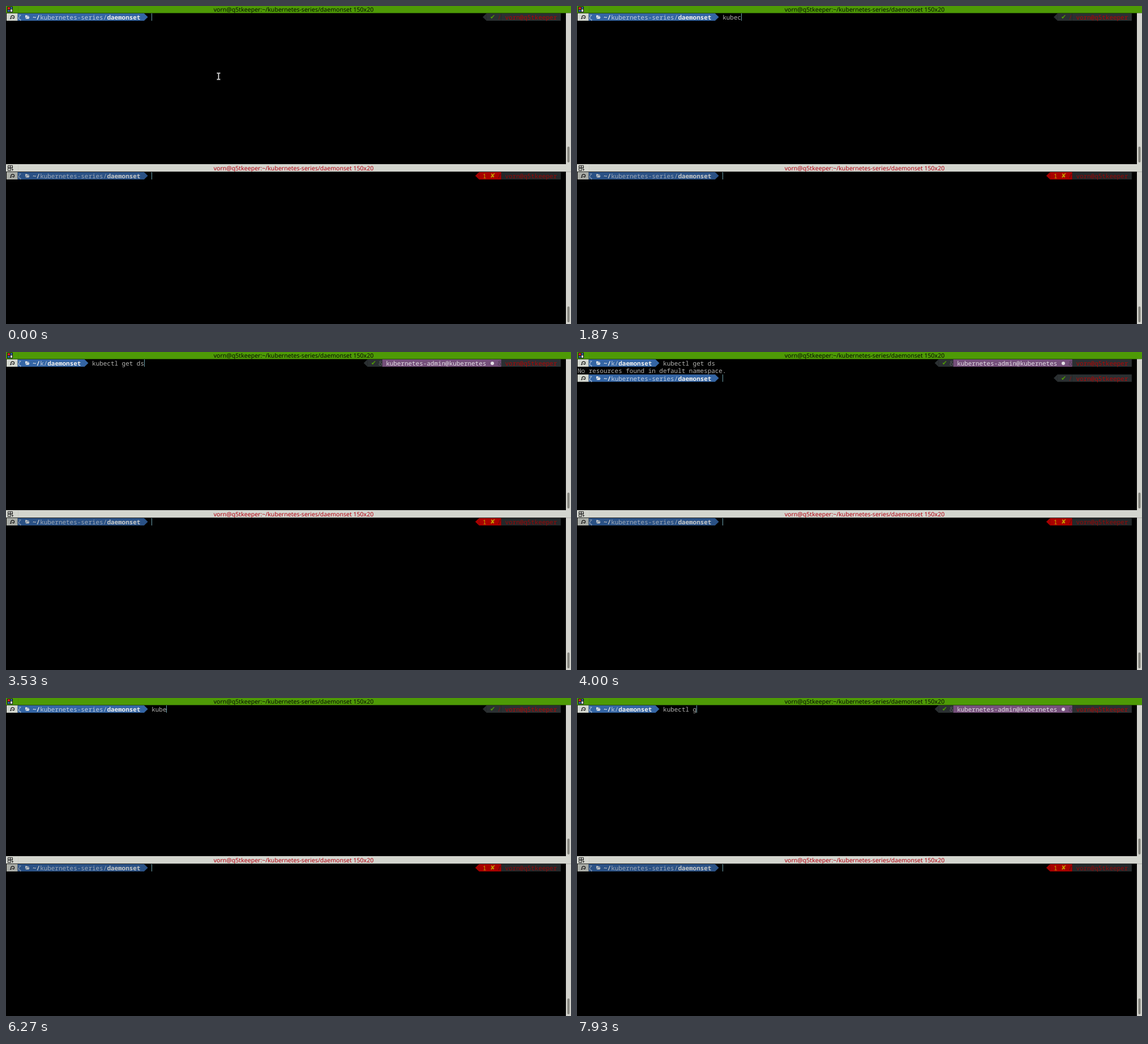
Animation, 998 px wide and 561 px high, one loop 8000 ms. Source, as an HTML page:

```html
<!DOCTYPE html>
<html lang="en">
<head>
<meta charset="utf-8">
<title>Terminal session</title>
<style>
  html, body { margin: 0; width: 100%; height: 100%; overflow: hidden; background: #000; }
  svg { display: block; width: 100vw; height: 100vh; }
  text { white-space: pre; text-rendering: geometricPrecision; }
  .mono { font: 10.95px "Noto Sans Mono", monospace; }
  .bold { font-weight: 700; }
  .mark { font: 11px "DejaVu Sans", sans-serif; }
  .title { font: 10.55px "Noto Sans", sans-serif; text-anchor: middle; }
</style>
</head>
<body>
<svg id="stage" viewBox="0 0 998 561" preserveAspectRatio="none">
  <rect width="998" height="561"/>
  <g id="frame"></g>
  <g id="lower"></g>
  <g id="upper"></g>
  <g id="pointer" fill="none" stroke-linecap="square">
    <path d="M373.5 118.5h1.5l.5 1 .5-1h1.5M375.5 119.5v9M373.5 129.5h1.5l.5-1 .5 1h1.5" stroke="#777" stroke-width="2.4"/>
    <path d="M373.5 118.5h1.5l.5 1 .5-1h1.5M375.5 119.5v9M373.5 129.5h1.5l.5-1 .5 1h1.5" stroke="#e8e8e8"/>
  </g>
</svg>
<script>
const LOOP = 8000;
const CELL = 6.57, LINE = 13.3;
const USER = 'vorn@q5tkeeper';
const COMMAND = 'kubectl get ds';

// Moments at which each further letter of the command is typed
const FIRST_KEYS = [870, 1070, 1670, 1730, 1870, 2000, 2270, 2730, 2870, 3000, 3130, 3200, 3470, 3530];
const SECOND_KEYS = [5730, 5870, 6130, 6200, 6470, 6600, 6870, 7070, 7670];
const ENTER = 3930, OUTPUT = 4000, CLEAR = 4870;
const CURSOR_OFF = [[130, 730], [4530, CLEAR], [5530, 5730]];

const BRIGHT = {
  badge: '#d3d7cf', icon: '#222', blue: '#3465a4', dir: '#c3cfdf', strong: '#f0f0ee',
  dark: '#2b3032', status: '#2b3032', user: '#b00505', ok: '#4e9a06', faint: '#5c6163'
};
const DIM = {
  badge: '#a9aca6', icon: '#1c1c1c', blue: '#2a5185', dir: '#a0abb9', strong: '#c6c8c8',
  dark: '#23282a', status: '#a80000', user: '#980606', ok: '#c4a000', faint: '#4a1012'
};

const el = id => document.getElementById(id);
const colX = col => 1 + col * CELL;
const rect = (x, y, w, h, fill) =>
  `<rect x="${x}" y="${y}" width="${w}" height="${h}" fill="${fill}"/>`;
const path = (d, fill, extra = '') => `<path d="${d}" fill="${fill}" ${extra}/>`;
const text = (x, y, str, fill, cls = 'mono') =>
  `<text x="${x.toFixed(2)}" y="${y.toFixed(2)}" fill="${fill}" class="${cls}">${str}</text>`;
const block = (from, to, y, fill) => rect(colX(from), y, (to - from) * CELL, 13, fill);
const cursor = (col, y) => rect(Math.floor(colX(col)), y, 1, 13, '#6ba0ab');

function leftPrompt(y, short, c) {
  const base = y + 10.9;
  const dir = short ? 'k' : 'kubernetes-series';
  const end = 9 + dir.length + 10;
  const tip = colX(end + 1);
  return rect(1, y, 19.7, 13, c.badge)
    + path(`M9.2 ${y + 9.2}H7.2M9.2 ${y + 9.2}C6.4 ${y + 3} 15 ${y + 2.2} 14.6 ${y + 6.8}C14.4 ${y + 9.4} 11.8 ${y + 9.2} 11.4 ${y + 7.2}`,
      'none', `stroke="${c.icon}" stroke-width="1.4"`)
    + block(3, end + 1, y, c.blue)
    + path(`M${tip - .2} ${y}l6.7 6.5l-6.7 6.5z`, c.blue)
    + text(colX(3), base, 'ζ', c.dir)
    + path(`M34 ${y + 3.5}h3l1 1h2.5v1.2h-4.3l-1.8 3.2zM36.7 ${y + 6.4}h5l-1.5 3.2h-5.5z`, c.strong)
    + text(colX(7), base, '~/', c.strong, 'mono bold')
    + text(colX(9), base, dir + '/', c.dir)
    + text(colX(10 + dir.length), base, 'daemonset', c.strong, 'mono bold');
}

function rightPrompt(y, c, { start, mark, code = '', context = false }) {
  const base = y + 10.9, x = colX(start + 1);
  const statusEnd = context ? 101 : 133;
  let out = path(`M${x + .2} ${y}l-6.7 6.5l6.7 6.5z`, c.status)
    + block(start + 1, statusEnd, y, c.status)
    + block(133, 149, y, c.dark)
    + text(colX(start + 2), base, code, c.ok)
    + text(colX(context ? 98 : 130), base - .6, mark, c.ok, 'mark');
  if (context) {
    out += text(colX(100), base, 'δ', c.faint)
      + block(101, 133, y, '#75507b')
      + text(colX(102), base, 'kubernetes-admin@kubernetes', '#e4dfe5')
      + `<circle cx="859" cy="${y + 7}" r="3" fill="#e4dfe5"/>`
      + text(colX(132), base, 'δ', '#4b3a50');
  } else {
    out += text(colX(132), base, '/', code ? c.faint : '#801414');
  }
  return out + text(colX(134), base, USER, c.user);
}

const upperRow = (y, short) => leftPrompt(y, short, BRIGHT)
  + rightPrompt(y, BRIGHT, { start: short ? 96 : 128, mark: '✔', context: short });

function drawFrame() {
  const title = `${USER}:~/kubernetes-series/daemonset 150x20`;
  const bar = (y, h, fill, color) => rect(0, y, 998, h, fill)
    + text(508, y + h - 2.4, title, color, 'title');
  const scroll = (y, h, thumb) => rect(989, y, 9, h, '#d3d3cd')
    + `<rect x="991.5" y="${thumb}" width="4" height="28" rx="2" fill="#85857f"/>`;
  const outline = 'stroke="#222" stroke-width="1"';
  el('frame').innerHTML = bar(0, 12.5, '#4e9a06', '#060a02')
    + rect(21, 1, 1, 11, '#489005')
    + rect(2, 1, 10, 10, '#16181a')
    + rect(3, 2, 4, 4, '#d02020') + rect(8, 2, 3, 3, '#3465a4')
    + rect(3, 7, 4, 3, '#3465a4') + rect(8, 6, 3, 4, '#e8e8e8')
    + scroll(12.5, 266.5, 248)
    + bar(279, 13.2, '#d3d5ce', '#b40010')
    + rect(21, 280, 1, 11, '#c8cac4')
    + path('M3.5 281.5h8v5h-8zM7.5 281.5v9M3.5 286.5v4h5M3.5 284.5h8', 'none', outline)
    + path('M9 288h4.5l-2.2 2.6z', '#222')
    + scroll(292.2, 269, 530);
  el('lower').innerHTML = leftPrompt(293, false, DIM)
    + rightPrompt(293, DIM, { start: 126, mark: '✘', code: '1' })
    + cursor(39, 293);
}

function drawUpper(count, short, stage, lit) {
  const y = 13, col = short ? 23 : 39;
  let out = upperRow(y, short) + text(colX(col), y + 10.9, COMMAND.slice(0, count), '#b4b4b2');
  let at = [col + count, y];
  if (stage > 0) at = [0, y + LINE];
  if (stage > 1) {
    out += text(colX(0), y + LINE + 10.9, 'No resources found in default namespace.', '#b4b4b2')
      + upperRow(y + 2 * LINE, false);
    at = [39, y + 2 * LINE];
  }
  el('upper').innerHTML = out + (lit ? cursor(...at) : '');
}

let lastState = '';
function render(t) {
  const again = t >= CLEAR;
  const keys = again ? SECOND_KEYS : FIRST_KEYS;
  const count = keys.filter(k => k <= t).length;
  const short = t >= keys[6] + 60;
  const stage = again || t < ENTER ? 0 : t < OUTPUT ? 1 : 2;
  const lit = !CURSOR_OFF.some(([from, to]) => t >= from && t < to);
  const state = [count, short, stage, lit].join();
  if (state !== lastState) {
    drawUpper(count, short, stage, lit);
    lastState = state;
  }
  el('pointer').style.display = t < FIRST_KEYS[0] ? '' : 'none';
}

drawFrame();
render(0);
const begin = performance.now();
function tick() {
  render((performance.now() - begin) % LOOP);
  requestAnimationFrame(tick);
}
requestAnimationFrame(tick);
</script>
</body>
</html>
```
